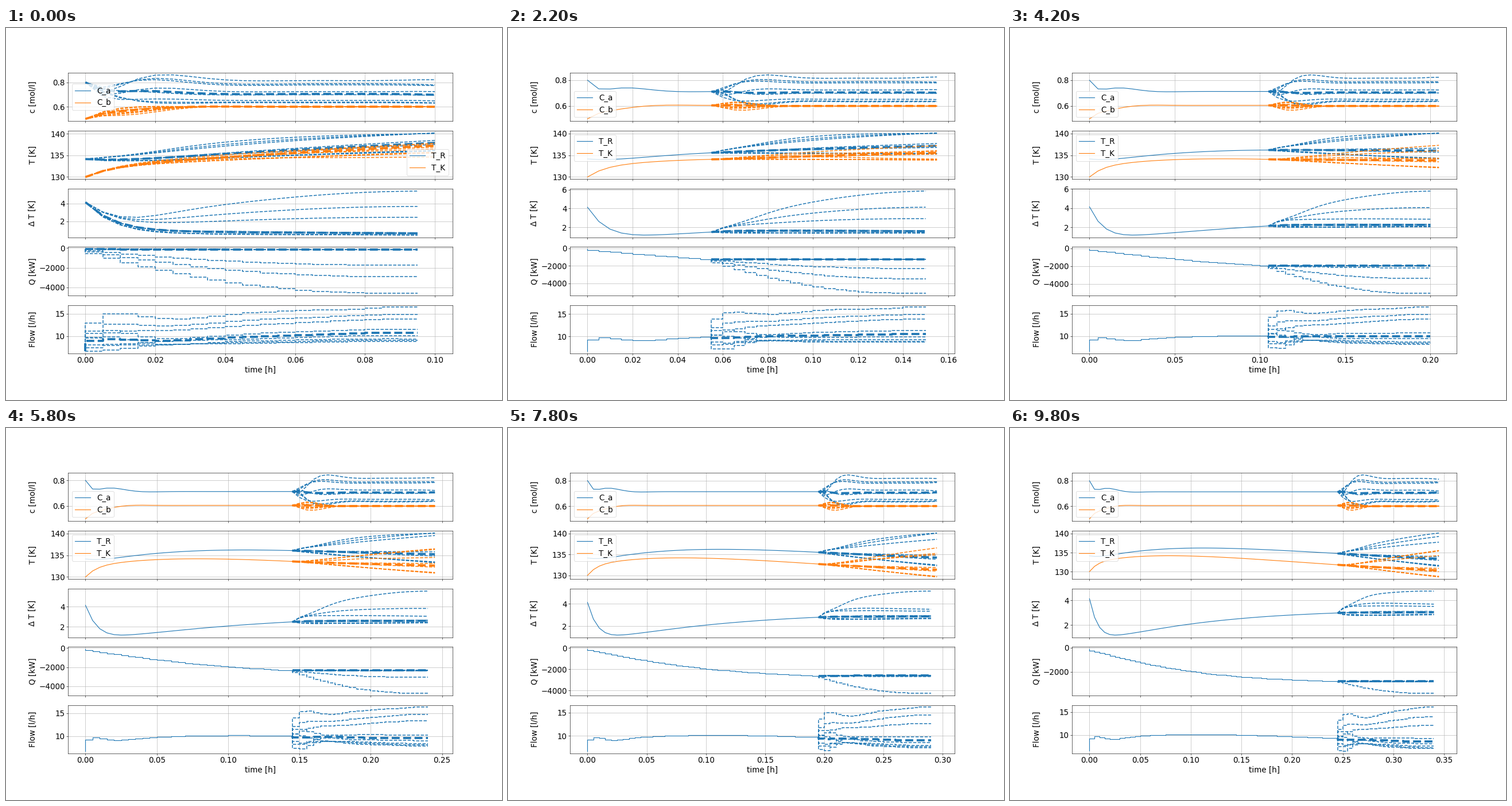
Recreate the animation shown at these times as a matplotlib script. Size 864 px wide and 648 px high, loop 10 s.

```python
import numpy as np
import matplotlib.pyplot as plt
from matplotlib.animation import FuncAnimation

plt.rcParams.update({
    "font.family": "DejaVu Sans",
    "font.size": 18,
    "axes.grid": True,
})

# Stirred tank reactor under robust predictive control.
DT = 0.005
FRAMES = 50
N = 20                                   # horizon
ALPHA = np.repeat([1.0, 1.05, 0.95], 3)  # one entry per scenario
BETA = np.tile([1.0, 1.1, 0.9], 3)
S = len(ALPHA)

SCALE = np.array([100.0, 2000.0])        # flow, heat
TARGET, T_MAX = 0.6, 140.0

# Rows and gradients of the input-change penalty
MOVE_W = np.tile(np.sqrt([0.1, 1e-3]), N)
MOVE = MOVE_W[:, None] * (np.eye(2 * N) - np.eye(2 * N, k=-2))
MOVE_H = MOVE.T @ MOVE

EPS = 1e-5
PERT_X = EPS * np.eye(4, 7, 1)[:, :, None]
PERT_U = EPS * np.eye(2, 7, 5)[:, :, None]


def rates(x, u, alpha, beta):
    ca, cb, tr, tk = x
    flow, heat = u
    inv = 1 / (tr + 273.15)
    k = 1.287e12 * np.exp(-9758.3 * inv)
    ab = beta * k * ca
    bc = k * cb
    ad = 9.043e9 * np.exp(-8560.0 * alpha * inv) * ca * ca
    jacket = 4032.0 * 0.215 * (tr - tk)
    rho_cp = 0.9342 * 3.01
    return np.stack([
        flow * (5.1 - ca) - ab - ad,
        ab - bc - flow * cb,
        (11.0 * bc + 41.85 * ad - 4.2 * ab) / rho_cp
        + flow * (130.0 - tr) - jacket / (rho_cp * 10.01),
        (heat + jacket) / 10.0,
    ])


def step(x, u, alpha=1.0, beta=1.0, parts=2):
    h = DT / parts
    for _ in range(parts):
        k1 = rates(x, u, alpha, beta)
        k2 = rates(x + h / 2 * k1, u, alpha, beta)
        k3 = rates(x + h / 2 * k2, u, alpha, beta)
        k4 = rates(x + h * k3, u, alpha, beta)
        x = x + h / 6 * (k1 + 2 * k2 + 2 * k3 + k4)
    return x


def expand(v, x0, u_prev):
    """Roll out all scenarios and linearise the tracking problem."""
    x = np.repeat(x0[:, None], S, axis=1)
    sens = np.zeros((4, S, 2 * N))
    states, slopes = [x], []
    for k in range(N):
        u = (v[:, k].T[:, None, :] + PERT_U) * SCALE[:, None, None]
        y = step(x[:, None, :] + PERT_X, u, ALPHA, BETA)
        x = y[:, 0]
        j = (y[:, 1:] - y[:, :1]) / EPS
        sens = np.einsum("ijs,jsn->isn", j[:, :4], sens)
        sens[:, :, 2 * k:2 * k + 2] += j[:, 4:].transpose(0, 2, 1)
        states.append(x)
        slopes.append(sens)
    states, slopes = np.array(states), np.array(slopes)

    jac = slopes[:, 1].transpose(1, 0, 2) / 3
    res = (states[1:, 1].T - TARGET) / 3
    move = v.reshape(S, -1) @ MOVE.T
    move[:, :2] -= MOVE_W[:2] * u_prev
    jac_t = jac.transpose(0, 2, 1)
    grad = (jac_t @ res[:, :, None])[:, :, 0] + move @ MOVE
    hess = jac_t @ jac + MOVE_H
    limit = slopes[:-1, 2].transpose(1, 0, 2)
    room = T_MAX - states[1:-1, 2].T
    return states, grad, hess, limit, room


def newton(grad, hess):
    """Newton step where the first input is shared by all scenarios."""
    b = hess[:, 2:, :2]
    sol = np.linalg.solve(hess[:, 2:, 2:],
                          np.concatenate([b, grad[:, 2:, None]], axis=2))
    bs = b.transpose(0, 2, 1) @ sol
    schur = (hess[:, :2, :2] - bs[:, :, :2]).sum(axis=0)
    rhs = (grad[:, :2] - bs[:, :, 2]).sum(axis=0)
    first = -np.linalg.solve(schur, rhs)
    rest = -(sol[:, :, :2] @ first + sol[:, :, 2])
    return np.concatenate([np.tile(first, (S, 1)), rest], axis=1)


def mul(mat, vec):
    return (mat @ vec[:, :, None])[:, :, 0]


def longest(a, da):
    """Largest share of da that keeps a positive."""
    return 0.99 / max(0.99, (-da / a).max())


def solve_qp(grad, hess, limit, room):
    """Interior point method for the quadratic model with limit @ d <= room."""
    limit_t = limit.transpose(0, 2, 1)
    d = np.zeros_like(grad)
    slack = np.maximum(room, 0.5)
    lam = np.full_like(room, 1e-3)
    for _ in range(25):
        mu = (slack * lam).mean()
        if mu < 1e-10:
            break
        dual = mul(hess, d) + grad + mul(limit_t, lam)
        gap = mul(limit, d) + slack - room
        push = (0.1 * mu - slack * lam + lam * gap) / slack
        weight = lam / slack
        dd = newton(dual + mul(limit_t, push),
                    hess + limit_t @ (weight[:, :, None] * limit))
        change = mul(limit, dd)
        dslack = -gap - change
        dlam = push + weight * change
        a = min(longest(slack, dslack), longest(lam, dlam))
        d, slack, lam = d + a * dd, slack + a * dslack, lam + a * dlam
    return d


def optimise(v, x0, u_prev, tries):
    for _ in range(tries):
        states, *model = expand(v, x0, u_prev)
        d = solve_qp(*model).reshape(S, N, 2)
        size = np.abs(d).max()
        v = v + d * min(1, 0.7 / size)
        if size < 5e-4:
            break
    return v, states


def simulate():
    x = np.array([0.8, 0.5, 134.14, 130.0])
    u_prev = np.zeros(2)
    v = np.tile(np.array([9.0, -200.0]) / SCALE, (S, N, 1))
    past, plans = [], []
    for k in range(FRAMES):
        v, xs = optimise(v, x, u_prev, 5 if k else 20)
        us = (v * SCALE).transpose(1, 2, 0)
        plan = [xs[:, i] for i in range(4)]
        plan += [xs[:N, 2] - xs[:N, 3], us[:, 0], us[:, 1]]
        plans.append(plan)
        past.append([p[0, 0] for p in plan])
        u_prev = v[0, 0].copy()
        x = step(x, u_prev * SCALE)
        v = np.concatenate([v[:, 1:], v[:, -1:]], axis=1)
        v[:, 0] = u_prev
    return np.array(past), plans


past, plans = simulate()
time = DT * np.arange(FRAMES + N + 1)

fig, axes = plt.subplots(5, sharex=True, figsize=(16, 12), dpi=54)
fig.subplots_adjust(left=0.125, right=0.9, bottom=0.125, top=0.88, hspace=0.2)

# Panel, colour and draw style; order: C_a, C_b, T_R, T_K, difference, flow, heat
SERIES = [
    (0, "C0", "default"), (0, "C1", "default"),
    (1, "C0", "default"), (1, "C1", "default"),
    (2, "C0", "default"), (4, "C0", "steps"), (3, "C0", "steps"),
]

result_lines, plan_lines = [], []
for panel, color, style in SERIES:
    ax = axes[panel]
    result_lines += ax.plot([], [], color=color, drawstyle=style, lw=1.5)
    plan_lines.append([
        ax.plot([], [], "--", color=color, drawstyle=style,
                lw=2 if s else 5)[0]
        for s in range(S)
    ])

LABELS = ["c [mol/l]", "T [K]", r"$\Delta$ T [K]", "Q [kW]", "Flow [l/h]"]
for ax, label in zip(axes, LABELS):
    ax.set_ylabel(label)
axes[4].set_xlabel("time [h]")
axes[0].legend(result_lines[:2], ["C_a", "C_b"])
axes[1].legend(result_lines[2:4], ["T_R", "T_K"])
fig.align_ylabels()


def update(k):
    for i, line in enumerate(result_lines):
        line.set_data(time[:k + 1], past[:k + 1, i])
        values = plans[k][i]
        t = time[k:k + len(values)]
        for s, plan_line in enumerate(plan_lines[i]):
            plan_line.set_data(t, values[:, s])
    for ax in axes:
        ax.relim()
        ax.autoscale()
    return result_lines


anim = FuncAnimation(fig, update, frames=FRAMES, interval=200,
                     init_func=lambda: update(0), repeat=True, blit=False)
plt.show()
```
